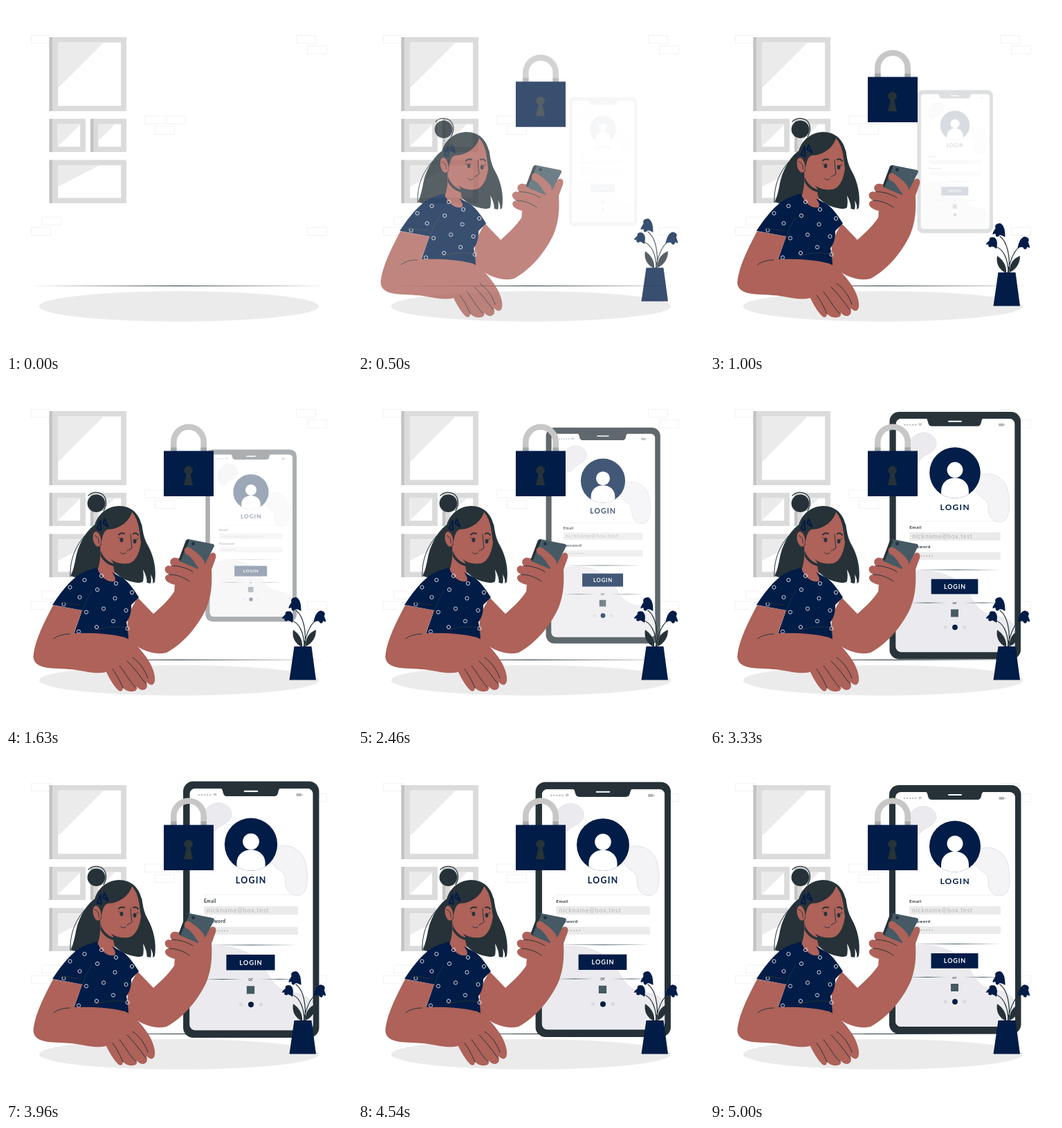
Write an HTML page that moves like this. It is 500 by 500 pixels and loops after 5.04 s.

```html
<!DOCTYPE html>
<html lang="en">
<head>
<meta charset="utf-8">
<title>Login illustration</title>
<style>
  html, body { margin: 0; width: 100%; height: 100%; overflow: hidden; background: #fff; }
  svg { display: block; width: 100vw; height: 100vh; }
  text { font-family: Lato, sans-serif; }
  .navy { fill: #001c47; }
  .dark { fill: #263238; }
  .skin { fill: #ae6259; }
  .pale { fill: #ebebeb; }
  .line { fill: none; stroke: #263238; stroke-width: 1; stroke-linecap: round; stroke-linejoin: round; }
  .blob { fill: #ebebef; stroke: #d3d3db; stroke-width: .6; }
</style>
</head>
<body>
<svg viewBox="0 0 500 500">
  <defs>
    <path id="flower" class="navy" d="M2-11C8-8 9 0 9 9C6 7 3 6 1 6C0 8-2 9-4 8C-5 6-5 5-5 4L-9 5C-9 1-6-1-5-4C-6-7-5-9-3-10C-1-11 1-11 2-11Z"/>
    <clipPath id="screen"><rect x="268" y="55" width="173" height="339" rx="8"/></clipPath>
    <clipPath id="avatar"><circle cx="354" cy="133.5" r="37"/></clipPath>
  </defs>

  <g id="bricks" fill="none" stroke="#ededed" stroke-width=".7"></g>
  <g id="windows"></g>
  <ellipse class="pale" cx="250" cy="434" rx="202" ry="22"/>
  <path class="dark" d="M38 404.5L250 403.95L462 404.5L250 405.05Z"/>

  <g id="phone">
    <rect class="dark" x="259" y="45" width="190.5" height="359.5" rx="14"/>
    <g clip-path="url(#screen)">
      <rect x="268" y="55" width="173" height="339" fill="#fff"/>
      <path class="blob" d="M291 84C297 77 307 73 316 77C326 81 330 91 324 99C318 107 310 106 304 114C299 122 289 120 286 111C283 102 285 91 291 84Z"/>
      <path class="blob" style="fill:#f4f4f6" d="M386 139C400 131 420 136 428 152C434 165 435 190 429 200C423 208 410 206 405 197C399 187 406 179 397 172C384 165 374 147 386 139Z"/>
      <path class="blob" d="M262 292C282 276 312 273 335 280C360 288 370 302 379 318C388 334 400 341 416 342C430 344 437 350 445 362V400H262Z"/>
    </g>
    <path class="dark" d="M310 54H397C393 55 393 57 392 61C391 65 389 66 386 66H321C318 66 316 65 315 61C314 57 314 55 310 54Z"/>
    <path d="M345 59H363" stroke="#fff" stroke-width="2" stroke-linecap="round"/>
    <path d="M281 64H298" stroke="#c0c0c0" stroke-width="2.6" stroke-linecap="round" stroke-dasharray="0 4"/>
    <path d="M300.5 63Q303.5 60 306.5 63L303.5 66Z" fill="#c8c8c8"/>
    <rect x="417.5" y="62" width="7.5" height="4" rx="1" fill="#b5b5b5"/>
    <path d="M426.5 63V65" stroke="#b5b5b5"/>

    <circle class="navy" cx="354" cy="133.5" r="37"/>
    <g clip-path="url(#avatar)" fill="#fff">
      <circle cx="354" cy="129.5" r="11.5"/>
      <path d="M334 175V160C334 148 343 141 354 141S374 148 374 160V175Z"/>
    </g>
    <text class="navy" x="354.2" y="188.3" font-size="12" font-weight="700" letter-spacing="1.3" text-anchor="middle">LOGIN</text>
    <path d="M288 204H420" stroke="#eee" stroke-width=".8"/>
    <g class="pale"><rect x="288" y="220" width="132" height="12"/><rect x="288" y="249" width="132" height="11"/></g>
    <g class="dark" font-size="6.3" font-weight="700" letter-spacing=".45">
      <text x="288" y="215">Email</text><text x="288" y="243.5">Password</text>
    </g>
    <text x="292" y="229" font-size="8.8" letter-spacing=".75" fill="#b4b4b4">nickname@box.test</text>
    <path d="M293 254.5H322" stroke="#b8b8b8" stroke-width="2" stroke-linecap="round" stroke-dasharray="0 4"/>
    <path fill="#455a64" d="M288 274.5L354 274L420 274.5L354 275ZM288 322.5L314 322L341 322.5L314 323ZM367 322.5L394 322L420 322.5L394 323Z"/>
    <rect class="navy" x="319.5" y="288" width="68" height="21.8"/>
    <text x="354" y="302.3" font-size="9" font-weight="700" letter-spacing=".9" fill="#fff" text-anchor="middle">LOGIN</text>
    <text class="dark" x="353.7" y="324.5" font-size="6.5" letter-spacing=".3" text-anchor="middle">or</text>
    <rect x="348" y="332" width="11" height="11" fill="#455a64"/>
    <g fill="#d9d9df"><circle cx="340" cy="358" r="2.6"/><circle cx="368" cy="358" r="2.6"/></g>
    <circle class="navy" cx="354" cy="358" r="3.9"/>
  </g>

  <g id="lock">
    <path d="M242.3 104V89.5a21.7 21.7 0 0 1 43.4 0V104" fill="none" stroke="#c7c7c7" stroke-width="8.6"/>
    <path d="M242.3 97.5V103.5M285.7 97.5V103.5" stroke="#a6a8a9" stroke-width="8.6"/>
    <rect class="navy" x="228" y="102.5" width="72" height="65.5"/>
    <path class="dark" d="M260.8 136L257 152.3H270L266.5 136A6.3 6.3 0 1 0 260.8 136Z"/>
  </g>

  <g id="plant">
    <path class="line" style="stroke-width:1.2" d="M432 386C434 362 430 341 419 333M431 386C431 366 424 350 411 347M430 386C434 366 440 350 451 346"/>
    <g class="dark">
      <path d="M428 386C417 381 413 371 415 361C424 367 429 376 428 386Z"/>
      <path d="M433 385C432 373 438 365 448 361C448 372 443 380 433 385Z"/>
    </g>
    <use href="#flower" transform="translate(417.5 325)"/>
    <use href="#flower" transform="translate(407.5 342.5) rotate(12) scale(.9 .78)"/>
    <use href="#flower" transform="translate(454.5 343.5) rotate(12) scale(-.95 .92)"/>
    <path class="navy" d="M416.5 385H441.5L448 433.5H409.5Z"/>
  </g>

  <g id="woman">
    <path class="dark" d="M127 210C112 222 104 242 101 256C99 268 96 278 93.5 283C105 288 119 287 133 280L155 276L166 285C174 290 182 292 190 293C193 293 196 293 198 291C199 286 199 280 198 274C202 281 204 288 203.5 293L209 294C210 290 210 286 209 281C212 286 213 290 212 294L215 292C218 273 213 253 205 239C199 228 198 220 196 208Z"/>
    <path class="line" d="M120 219C101 236 92 259 93 284"/>
    <path class="skin" d="M136 236C137 254 136 266 131 279C136 290 148 297 164 290C157 281 155 273 155 264Z"/>
    <path class="dark" d="M137 247C141 259 151 266 164 267L155 269C147 267 140 261 136.5 254Z"/>
    <path class="skin" d="M137 212L150 196L182 188C192 195 197 211 196 225C195 245 189 263 177 265C160 268 143 257 138 241Z"/>
    <path class="dark" d="M127 226C124 204 139 183 163 182C181 182 194 193 197 215C198 226 196 238 199 247C191 233 197 208 182 191C178 205 163 216 147 216C140 218 139 229 137 239C132 238 128 233 127 226Z"/>
    <ellipse class="skin" cx="131.5" cy="230" rx="5.7" ry="11" transform="rotate(-12 131.5 230)"/>
    <path class="line" d="M128 225C133 226 135 231 134 236" stroke-width=".8"/>
    <ellipse class="dark" cx="130.5" cy="178.3" rx="12.9" ry="12.8"/>
    <path class="line" d="M119 167C126 160 140 161 143.500 171C146 178 144 184 141 189" style="stroke-width:1.3"/>
    <path d="M136.500 203L131.500 215L137.500 217ZM142.500 201L140 207L147.500 212Z" fill="none" stroke="#001c47" stroke-width="2.200" stroke-linejoin="round"/>
    <g class="dark">
      <ellipse cx="167" cy="231" rx="2.4" ry="3.3"/><ellipse cx="186" cy="233" rx="2.4" ry="3.3"/>
    </g>
    <path class="line" d="M163 223.5Q166 220 171 222M184 222Q188 220 191 224" style="stroke-width:2"/>
    <path class="line" d="M164 229L162 227M188 231L191 229M180 223L181 235L182 243L175 247M165.5 249Q168 253 173 250"/>

    <path class="skin" d="M190 314L213 338C225 327 235 318 243 306C244 303 243 299 244 296C236 294 229 290 230 285C231 282 233 281 236 281C230 279 228 273 231 270C233 268 236 268 240 269C236 265 236 259 242 257C248 256 258 261 270 268L285 269C289 259 293 252 297 250C303 248 305 254 302 260L297 274C298 295 297 312 289 331C278 354 258 380 232 394C212 399 190 388 175 374L176 340Z"/>
    <path d="M264 230L299 237Q302 238 300.5 241L288 265L277 273L251 262Q249 260 250.5 257L260 232Q261 229.5 264 230Z" fill="#455a64"/>
    <path class="dark" d="M264 230L260 232L250 259L252 262L264 234Z"/>
    <circle class="dark" cx="270.5" cy="236.5" r="2.4"/>
    <path class="skin" d="M258 246C258 241 264 240 268 244C275 249 283 255 287 263L284 276C275 272 272 259 263 253C259 251 257 249 258 246Z"/>
    <path class="line" d="M240 268.500C250 268 262 272 270 277M236 281C246 281 257 285 265 291"/>

    <path class="navy" d="M122 274C104 279 90 291 67 325L110 333L98 367C128 374 154 380 177 377C177 368 176 360 174 350C180 342 181 334 181 325L192 314C185 303 178 293 170 287L153 278C158 284 159 288 157 291C145 293 137 284 131 271Z"/>
    <g id="dots" fill="none" stroke="#e8ebf0" stroke-width=".9"></g>
    <path class="line" d="M124 306C117 314 114 324 110 335M79 321L108 325M128 362C145 356 158 356 173 358"/>

    <path class="skin" d="M68 325.500C58 345 41 376 39.500 400C41 421 75 415 101 419C119 422 132 425 145 422C149 431 157 444 163 449C167 451 170 448 168 444C172 448 178 451 183 450C188 450 190 447 189 443C193 448 198 449 201 447C205 445 204 440 203 436C207 441 212 442 214 438C218 431 212 413 203 401C194 388 184 377 172 372C150 366 122 365 98 366L110 333Z"/>
    <path class="line" d="M69 374C75 369 83 367 92 367M164 413C171 421 178 435 187 444M175 406C184 415 194 428 202 439M183 401C193 408 201 419 205 431M154 418C159 424 165 435 169 445"/>
  </g>
</svg>
<script>
const byId = id => document.getElementById(id);

byId('bricks').innerHTML = [[36.5, 42.5], [419.5, 42.5], [435.5, 57.5], [200, 159], [231.5, 159],
  [215.5, 174], [52, 305], [36.5, 320], [435.5, 320]]
  .map(([x, y]) => `<rect x="${x}" y="${y}" width="28" height="11.5"/>`).join('');

// x, y, width, height, left inset, glare width, glare height
byId('windows').innerHTML = [[62.5, 45, 111.5, 107, 12.5, 66, 66], [62.5, 163, 52.5, 48, 11.5, 34, 33],
  [122, 163, 52, 48, 11.5, 24, 24], [62.5, 222.5, 111.5, 62.5, 12.5, 60, 31]]
  .map(([x, y, w, h, inset, gw, gh]) => `
    <rect x="${x}" y="${y}" width="${w}" height="${h}" fill="#dbdbdb"/>
    <rect x="${x}" y="${y}" width="4.5" height="${h}" fill="#c4c4c4"/>
    <rect x="${x + inset}" y="${y + 7.7}" width="${w - inset - 7.8}" height="${h - 15.4}" fill="#fff"/>
    <path class="pale" d="M${x + inset} ${y + 7.7}h${gw}l${-gw} ${gh}Z"/>`).join('');

byId('dots').innerHTML = [[92.5, 299.5], [113.5, 289], [138, 283], [106.5, 314], [83.5, 324], [116, 335.5], [132, 303],
  [159, 294], [182, 307], [141, 330.5], [157.5, 315.5], [173.5, 333], [105, 363.5], [131, 357], [155, 348.5], [175.5, 359]]
  .map(([x, y]) => `<circle cx="${x}" cy="${y}" r="2.6"/>`).join('');

const LOOP = 5040;
const LEAD = 15; // the entrances are slightly ahead of the loop clock
const curve = (a, b, s) => 3 * (1 - s) ** 2 * s * a + 3 * (1 - s) * s * s * b + s ** 3;

// cubic-bezier(.36, -.01, .5, 1.38), solved by bisection
function ease(p) {
  if (p >= 1) return 1;
  let low = 0, high = 1;
  for (let i = 0; i < 24; i++) {
    const mid = (low + high) / 2;
    if (curve(.36, .5, mid) < p) low = mid; else high = mid;
  }
  return curve(-.01, 1.38, low);
}

function pose(id, transform, progress) {
  const node = byId(id);
  node.setAttribute('transform', transform);
  node.setAttribute('opacity', Math.min(1, Math.max(0, progress)));
}

function draw(time) {
  const slide = ease((time + LEAD) / 1000), zoom = ease((time + LEAD) / 5000);
  const offset = 30 * (1 - slide);
  pose('woman', `translate(${-offset} 0)`, slide);
  pose('lock', `translate(0 ${offset})`, slide);
  pose('plant', `translate(0 ${-offset})`, slide);
  pose('phone', `translate(354 225) scale(${.5 + .5 * zoom}) translate(-354 -225)`, zoom);
}

const start = performance.now();
function tick() {
  draw((performance.now() - start) % LOOP);
  requestAnimationFrame(tick);
}
tick();
</script>
</body>
</html>
```
